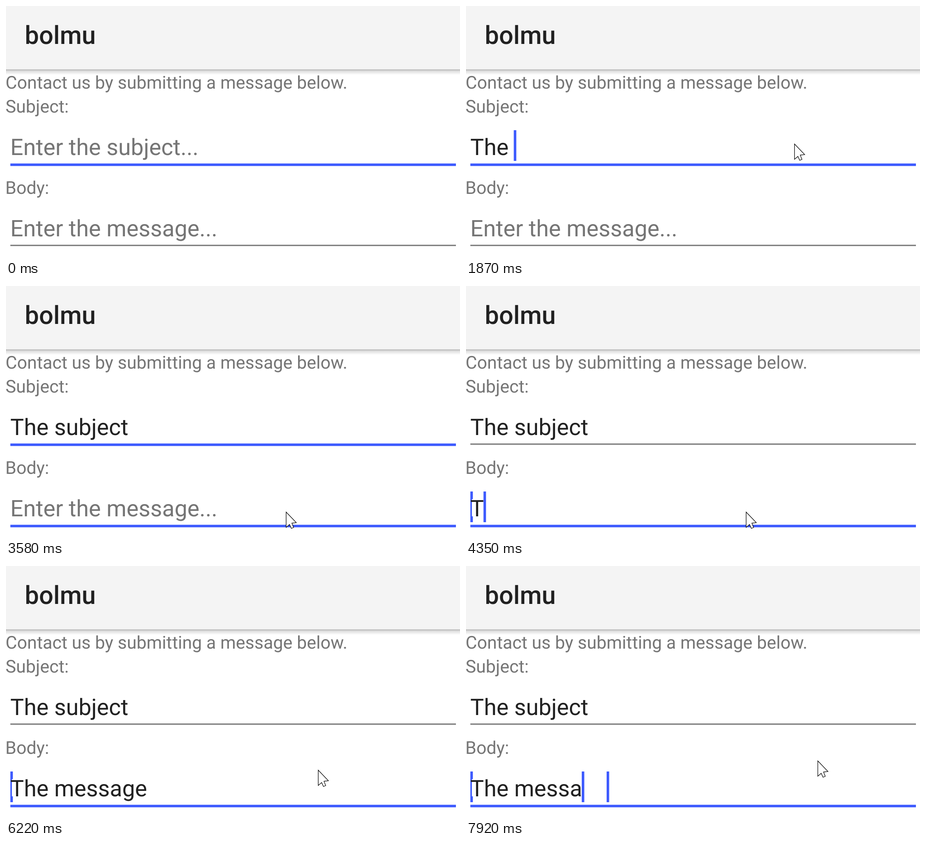
Recreate the animation shown at these times as an HTML page with a canvas. Size 1004 by 558 pixels, loop 8 s.

```html
<!DOCTYPE html>
<html lang="en">
<head>
<meta charset="utf-8">
<title>Contact form</title>
<style>
  html, body { margin: 0; width: 100%; height: 100%; overflow: hidden; background: #fff; }
  canvas { display: block; }
</style>
</head>
<body>
<canvas id="stage" width="1004" height="558"></canvas>
<script>
const ctx = document.getElementById('stage').getContext('2d');
const LOOP = 8000, BLINK = 540, STEP = 78;
const BLUE = '#3d5afe', GRAY = '#757575', INK = '#212121';
const LEFT = 9.6, RIGHT = 995, HEADER = 140.5;
const LABEL = '39.15px Roboto, sans-serif';
const INPUT = '50.4px Roboto, sans-serif';
const TITLE = '500 55.8px Roboto, sans-serif';

const subject = { text: 'The subject', hint: 'Enter the subject...', top: 275, focus: 340, start: 1480, pace: 120 };
const body = { text: 'The message', hint: 'Enter the message...', top: 455, focus: 3660, start: 4320, pace: 132 };
const ERASE = { start: 7620, pace: 300 };

// Each move follows a quadratic curve: from, control point, to.
const moves = [
  { start: 160, duration: 312, path: [[857, 511], [755, 335], [726.5, 305.5]] },
  { start: 2870, duration: 390, path: [[726.5, 305.5], [655, 490], [619.5, 500.5]] },
  { start: 6220, duration: 702, path: [[690.5, 452], [832, 175], [778, 431.5]] }
];
const arrow = new Path2D('M0 0V34L7.5 27.5L11.5 36.2L16.5 34.2L12.7 24.6L22.5 23.6Z');

const clamp = (value, low, high) => Math.min(high, Math.max(low, value));
const keysPressed = (t, { start, pace }) => Math.max(0, Math.floor((t - start) / pace) + 1);
const lastKey = field => field.start + (field.text.length - 1) * field.pace;

function rect(x, y, w, h, color) {
  ctx.fillStyle = color;
  ctx.fillRect(x, y, w, h);
}

function text(string, x, baseline, font, color) {
  ctx.font = font;
  ctx.fillStyle = color;
  ctx.fillText(string, x, baseline);
}

function caret(typed, top) {
  ctx.font = INPUT;
  rect(Math.max(LEFT, LEFT + ctx.measureText(typed).width - 1), top, 5.6, 68, BLUE);
}

// The caret blinks from the moment of focus, and again from the latest key.
function caretVisible(field, t) {
  const since = t < field.start ? field.focus : Math.min(t, lastKey(field));
  return t >= since && Math.floor((t - since) / BLINK) % 2 === 0;
}

function underline(field, active) {
  rect(LEFT, field.top + 73.7, RIGHT - LEFT, active ? 5.6 : 2.8, active ? BLUE : GRAY);
}

function inputText(field, typed) {
  text(typed || field.hint, LEFT, field.top + 55, INPUT, typed ? INK : GRAY);
}

function drawPage() {
  rect(0, 0, 1004, 558, '#fff');
  const shadow = ctx.createLinearGradient(0, HEADER, 0, HEADER + 12);
  shadow.addColorStop(0, 'rgba(0,0,0,.32)');
  shadow.addColorStop(.3, 'rgba(0,0,0,.13)');
  shadow.addColorStop(1, 'rgba(0,0,0,0)');
  rect(0, 140, 1004, 13, shadow);
  rect(0, 0, 1004, HEADER, '#f4f4f4');
  text('bolmu', 41.5, 84, TITLE, INK);
  text('Contact us by submitting a message below.', -1, 183, LABEL, GRAY);
  text('Subject:', -1, 236, LABEL, GRAY);
  text('Body:', -1.5, 416, LABEL, GRAY);
}

function drawSubject(t) {
  const typed = subject.text.slice(0, keysPressed(t, subject));
  inputText(subject, typed);
  if (t < body.focus && caretVisible(subject, t)) caret(typed, subject.top);
  underline(subject, t < body.focus);
}

function drawBody(t) {
  const count = Math.min(body.text.length, keysPressed(t, body)) - keysPressed(t, ERASE);
  const typed = body.text.slice(0, count);
  const visible = caretVisible(body, t);
  // The first caret never clears; the hint's first stem leaves a notch in it.
  if (t >= body.focus) caret('', body.top);
  if (typed) rect(13, body.top + 17, 3, 38, '#fff');
  inputText(body, typed);
  if (visible || t >= ERASE.start) caret(typed, body.top);
  // The caret at the end of the full text also stays behind.
  if (t >= lastKey(body) + 2 * BLINK) caret(body.text, body.top);
  underline(body, t >= body.focus - STEP - 2);
}

function drawPointer(t) {
  const move = moves.filter(m => m.start <= t).pop();
  if (!move) return;
  const elapsed = Math.floor((t - move.start) / STEP) * STEP;
  const p = clamp(elapsed / move.duration, 0, 1), q = 1 - p;
  const [from, control, to] = move.path;
  const [x, y] = from.map((v, i) => q * q * v + 2 * q * p * control[i] + p * p * to[i]);
  ctx.save();
  ctx.translate(x, y);
  ctx.fillStyle = '#fff';
  ctx.strokeStyle = '#000';
  ctx.lineWidth = 1.2;
  ctx.fill(arrow);
  ctx.stroke(arrow);
  ctx.restore();
}

function frame(now) {
  const t = now % LOOP;
  drawPage();
  drawSubject(t);
  drawBody(t);
  drawPointer(t);
  requestAnimationFrame(frame);
}

ctx.textRendering = 'geometricPrecision';
requestAnimationFrame(frame);
</script>
</body>
</html>
```
